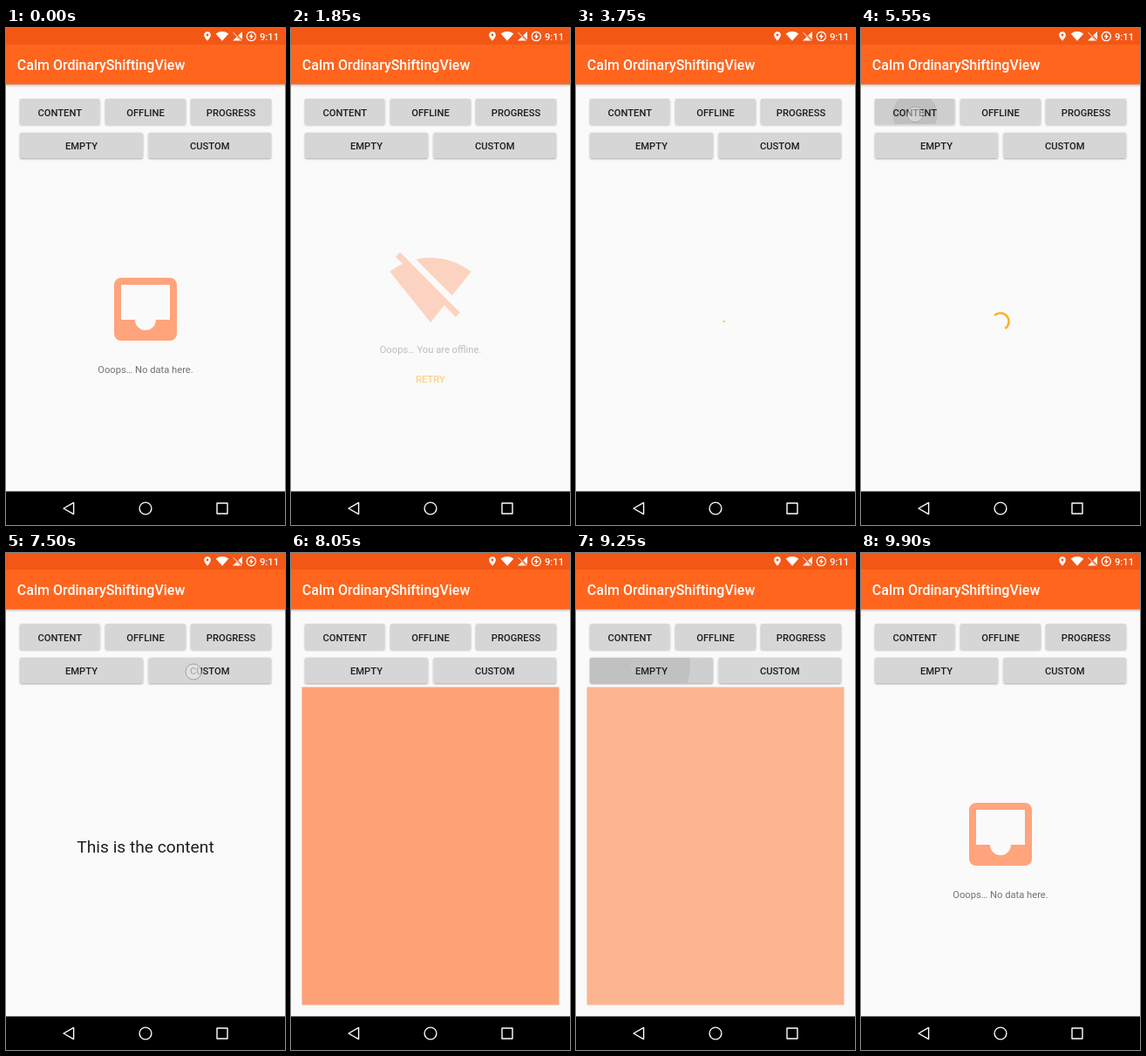
Animation of 320 by 569 pixels, one loop 9950 ms. Source, as an HTML page:

```html
<!DOCTYPE html>
<html lang="en">
<head>
<meta charset="utf-8">
<title>Layout states</title>
<style>
  html, body { margin: 0; width: 100%; height: 100%; overflow: hidden; background: #fafafa; }
  #stage { display: block; width: 100vw; height: 100vh; }
  text { font: 400 11.2px Roboto, "Noto Sans", sans-serif; fill: #737373; text-anchor: middle; }
  .medium { font-weight: 500; }
  .title { font-size: 16px; fill: #fff; text-anchor: start; }
  .clock { fill: #fff; text-anchor: start; }
  .label { fill: #1d1d1d; }
  .headline { font-size: 19.2px; fill: #1f1f1f; }
  .retry { fill: #ffa000; }
  .icon { fill: #ffa47c; }
  .button { fill: #d6d6d7; }
  .nav { fill: none; stroke: #fff; stroke-width: 1.4; stroke-linejoin: round; }
  .dot { fill: #e6e6e6; fill-opacity: .72; stroke: #999; stroke-width: .9; }
  #progress { fill: none; stroke: #ffa000; stroke-width: 2.4; }
</style>
</head>
<body>
<svg id="stage" viewBox="0 0 320 569" preserveAspectRatio="none">
  <defs>
    <linearGradient id="shade" x2="0" y2="1">
      <stop stop-color="#000" stop-opacity=".24"/>
      <stop offset="1" stop-color="#000" stop-opacity="0"/>
    </linearGradient>
    <filter id="lift" x="-10%" y="-20%" width="120%" height="150%">
      <feDropShadow dx="0" dy="1" stdDeviation=".8" flood-opacity=".34"/>
    </filter>
  </defs>

  <rect width="320" height="569" fill="#fafafa"/>
  <rect y="64" width="320" height="4" fill="url(#shade)"/>
  <rect y="19" width="320" height="45.5" fill="#ff651d"/>
  <rect width="320" height="19" fill="#f25716"/>
  <text class="title medium" x="12.8" y="48.3">Calm OrdinaryShiftingView</text>

  <g fill="#fff">
    <path fill-rule="evenodd" d="M231 14.8C228.5 11.8 227.2 9.8 227.2 8a3.8 3.8 0 0 1 7.6 0c0 1.8-1.3 3.8-3.8 6.8zM231 6.6a1.4 1.4 0 1 0 0 2.8a1.4 1.4 0 0 0 0-2.8z"/>
    <path d="M248 14.8L240.6 6.4Q248 1.6 255.4 6.4z"/>
    <path d="M271 4V14.5H260z"/>
    <path d="M260.6 4.6L270.6 14.6" stroke="#f25716" stroke-width="2.4"/>
    <path d="M260.4 5L269.8 14.4" stroke="#fff" stroke-width="1"/>
    <circle cx="281.3" cy="9.6" r="5.1" fill="none" stroke="#fff" stroke-width="1.3"/>
    <path d="M282.2 5.8L278.7 10.2H280.9L280.4 13.4L283.9 9H281.7z"/>
  </g>
  <text class="clock medium" x="291" y="13.5">9:11</text>

  <g id="buttons" filter="url(#lift)"></g>
  <g id="ripples"></g>
  <g id="labels"></g>

  <g id="empty">
    <path class="icon" transform="translate(112 274) scale(4)" d="M19 3H5a2 2 0 0 0-2 2V19a2 2 0 0 0 2 2H19a2 2 0 0 0 2-2V5a2 2 0 0 0-2-2zM19 15h-4a3 3 0 0 1-6 0H5V5H19z"/>
    <text x="160" y="394.6">Ooops… No data here.</text>
  </g>
  <g id="offline">
    <path class="icon" transform="translate(112 251) scale(4)" d="M23.64 7C23.19 6.66 18.71 3 12 3c-1.5 0-2.89.19-4.15.48L18.18 13.8zM17.04 15.22L3.27 1.44L2 2.72l2.05 2.06C1.91 5.76.59 6.82.36 7L12 21.5l3.91-4.87l3.32 3.32l1.27-1.27z"/>
    <text x="160" y="372">Ooops… You are offline.</text>
    <text class="retry medium" x="160" y="405.6">RETRY</text>
  </g>
  <path id="progress"/>
  <text id="content" class="headline" x="160" y="343.2">This is the content</text>
  <rect id="custom" x="12.5" y="153.5" width="295" height="364" fill="#ff651d"/>

  <g id="dots"></g>

  <rect y="530.5" width="320" height="38.5"/>
  <g class="nav">
    <path d="M66 550L77.6 543.4V556.6z"/>
    <circle cx="160" cy="550" r="6.9"/>
    <rect x="242" y="544" width="12" height="12"/>
  </g>
</svg>

<script>
const LOOP = 9950;
const OUT_DELAY = 120, OUT_TIME = 250;
const IN_DELAY = 370, IN_TIME = 500;

// name: x, y, width
const BUTTONS = {
  content: [16, 81, 91.5],
  offline: [114, 81, 92],
  progress: [212, 81, 92],
  empty: [16, 119.7, 141],
  custom: [163.5, 119.7, 140.5]
};
const HEIGHT = 29.3;

// Each tap opens the state of the same name.
const taps = [
  { at: 1350, to: 'offline', x: 160, y: 100 },
  { at: 3100, to: 'progress', x: 260, y: 99 },
  { at: 5400, to: 'content', x: 62, y: 99 },
  { at: 7500, to: 'custom', x: 215, y: 136 },
  { at: 9000, to: 'empty', x: 69, y: 129 }
];

const $ = id => document.getElementById(id);
const clamp = v => Math.min(1, Math.max(0, v));
const decelerate = p => 1 - (1 - p) ** 2;
const wrap = t => (t + LOOP) % LOOP;

function add(parent, tag, attrs, text) {
  const el = document.createElementNS('http://www.w3.org/2000/svg', tag);
  for (const key in attrs) el.setAttribute(key, attrs[key]);
  if (text) el.textContent = text;
  return parent.appendChild(el);
}

for (const [name, [x, y, width]] of Object.entries(BUTTONS)) {
  add($('buttons'), 'rect', { class: 'button', x, y, width, height: HEIGHT, rx: 1.8 });
  add($('labels'), 'text', { class: 'label medium', x: x + width / 2, y: y + 19.6 }, name.toUpperCase());
}

taps.forEach((tap, i) => {
  const [x, y, width] = BUTTONS[tap.to];
  tap.view = $(tap.to);
  tap.span = wrap(taps[(i + 1) % taps.length].at - tap.at);
  tap.reach = Math.hypot(width, HEIGHT) / 2;
  tap.ripple = add($('ripples'), 'svg', { x, y, width, height: HEIGHT });
  add(tap.ripple, 'rect', { width, height: HEIGHT, rx: 1.8, 'fill-opacity': .04 });
  tap.wave = add(tap.ripple, 'circle', { cx: tap.x - x, cy: tap.y - y, 'fill-opacity': .075 });
  tap.dot = add($('dots'), 'circle', { class: 'dot', cx: tap.x, cy: tap.y, r: 9 });
});

function drawTap(tap, t) {
  const dt = wrap(t - tap.at);
  const shown = decelerate(clamp((dt - IN_DELAY) / IN_TIME));
  const gone = clamp((dt - tap.span - OUT_DELAY) / OUT_TIME);
  tap.view.style.opacity = shown * (1 - gone);
  tap.dot.style.opacity = 1 - clamp((dt - 100) / 170);
  tap.ripple.style.opacity = clamp((dt - 40) / 60) * (1 - clamp((dt - 220) / 260));
  tap.wave.setAttribute('r', tap.reach * decelerate(clamp((dt - 50) / 320)));
}

// Smoothstep stands in for the fast-out, slow-in curve of the arc ends.
function drawSpinner(t) {
  const cycles = (t - 3083 + LOOP) / 1333;
  const p = cycles % 1;
  const ease = v => v * v * (3 - 2 * v);
  const tail = .75 * ease(clamp(p * 2 - 1));
  const head = .75 * ease(clamp(p * 2)) + .015;
  // The phase is anchored to the first cycle after the tap.
  const turn = (t - 3083) / 1333 * .4 + Math.floor((t - 3083) / 1333) + p * .25 - .195;
  const point = v => {
    const a = (v + turn) * 2 * Math.PI;
    return `${160 + 9.6 * Math.cos(a)} ${336 + 9.6 * Math.sin(a)}`;
  };
  const large = head - tail > .5 ? 1 : 0;
  $('progress').setAttribute('d', `M${point(tail)}A9.6 9.6 0 ${large} 1 ${point(head)}`);
}

const start = performance.now();

function frame() {
  const t = (performance.now() - start) % LOOP;
  for (const tap of taps) drawTap(tap, t);
  // Cycles are counted from the tap that starts the spinner.
  if (t > 3100 && t < 6000) drawSpinner(t);
  requestAnimationFrame(frame);
}
frame();
</script>
</body>
</html>
```
